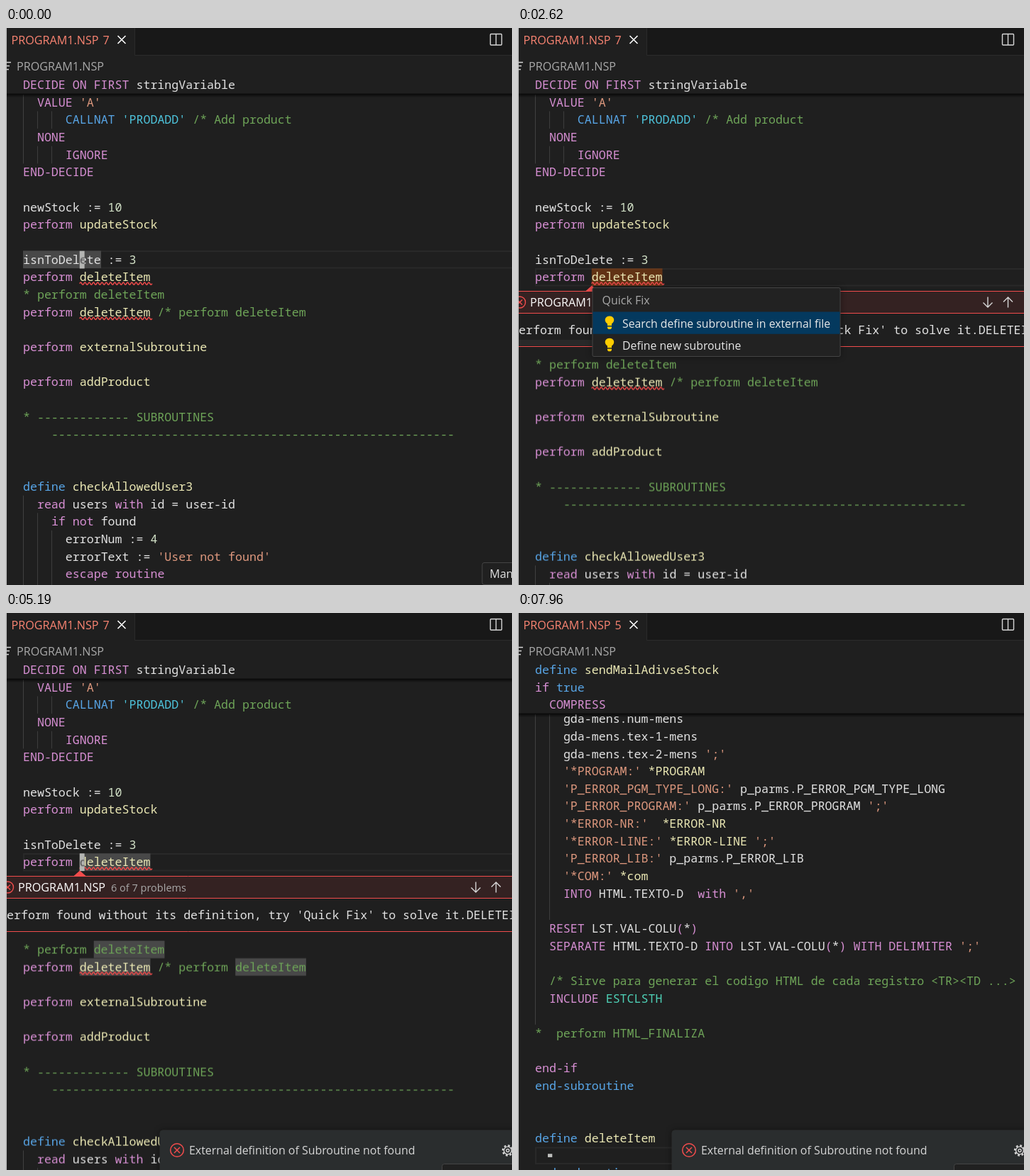
Animation, 713 px wide and 786 px high, one loop 8 s. Source, as an HTML page:

```html
<!DOCTYPE html>
<html lang="en">
<head>
<meta charset="utf-8">
<title>Editor quick fix</title>
<style>
html, body { margin: 0; width: 100%; height: 100%; overflow: hidden; background: #1f1f1f; }
svg { display: block; }
text { white-space: pre; font: 16px 'Open Sans', 'Noto Sans', sans-serif; fill: #d6d6d6; }
.mono, .mono text { font: 500 16.62px 'Noto Sans Mono', 'DejaVu Sans Mono', monospace; fill: #e2e2e2; }
.k { fill: #d78fd3; } .b { fill: #58a5e6; } .f { fill: #ebe8b4; } .s { fill: #de987e; }
.n { fill: #d3e2c8; } .c { fill: #6ea458; } .t { fill: #4ed0b6; } .v { fill: #4ec4dc; }
.dim { fill: #a9a9a9; } .bad { fill: #fa8472; } .title { font-size: 16.15px; }
.bg { fill: #1f1f1f; }
.guide { fill: #404040; }
.mark { fill: #484848; }
.row { fill: none; stroke: #292929; stroke-width: 2; }
.red { fill: none; stroke: #f14c4c; }
.icon { fill: none; stroke: #d6d6d6; stroke-width: 1.4; }
.pop { fill: #202020; stroke: #454545; }

/* 1% of the loop is 80 ms */
.anim { animation: 8s step-end infinite; }
#first { animation-name: first; }
#second, #cursorEnd { animation-name: second; }
#low { animation-name: low; }
#start { animation-name: start; }
#curA { animation-name: curA; }
#curB { animation-name: curB; }
#curC { animation-name: curC; }
#peek, #line { animation-name: peek; }
#bar { animation-name: bar; }
.words { animation-name: words; }
#menu, #target { animation-name: menu; }
#pick { animation-name: pick; }
#splitV { animation-name: splitV; }
#splitH { animation-name: splitH; }
#tip { animation-name: tip; }
#stickyA, #seven { animation-name: before; }
#stickyB, #five { animation-name: after; }
.hover { animation-name: hover; }
#gear { animation-name: gear; }
#toast { animation: toast 8s infinite; }
.blink { animation: blink 8s ease-in-out infinite; }

@keyframes first { 0% { opacity: 1 } 85.25%, 100% { opacity: 0 } }
@keyframes second { 0% { opacity: 0 } 85.25%, 100% { opacity: 1 } }
@keyframes low { 0% { transform: none } 20%, 100% { transform: translateY(98.6px) } }
@keyframes start { 0% { opacity: 1 } 20%, 100% { opacity: 0 } }
@keyframes curA { 0% { opacity: 1 } .8%, 100% { opacity: 0 } }
@keyframes curB { 0% { opacity: 0 } .8% { opacity: 1 } 20%, 100% { opacity: 0 } }
@keyframes curC {
  0% { opacity: 0 } 20% { opacity: 1 } 32.625% { opacity: 0 } 46.875% { opacity: 1 }
  71.625% { opacity: 0 } 84.25%, 100% { opacity: 1 }
}
@keyframes peek { 0% { opacity: 0 } 20%, 100% { opacity: 1 } }
@keyframes bar { 0% { opacity: 1 } 46.875%, 100% { opacity: 0 } }
@keyframes words { 0% { opacity: 0 } 49.25%, 100% { opacity: 1 } }
@keyframes menu {
  0% { opacity: 0 } 32.625% { opacity: 1 } 46.875% { opacity: 0 }
  71.625% { opacity: 1 } 84.25%, 100% { opacity: 0 }
}
@keyframes pick { 0% { transform: none } 80.125%, 100% { transform: translateY(31.3px) } }
@keyframes splitV { 0% { opacity: 1 } 16.7% { opacity: 0 } 24.25%, 100% { opacity: 1 } }
@keyframes splitH { 0% { opacity: 0 } 16.7% { opacity: 1 } 24.25%, 100% { opacity: 0 } }
@keyframes tip { 0% { opacity: 1 } 24.25%, 100% { opacity: 0 } }
@keyframes before { 0% { opacity: 1 } 89.125%, 100% { opacity: 0 } }
@keyframes after { 0% { opacity: 0 } 89.125%, 100% { opacity: 1 } }
@keyframes hover { 0% { opacity: 0 } 54.5% { opacity: 1 } 68.125% { opacity: 0 } 91%, 100% { opacity: 1 } }
@keyframes gear { 0% { opacity: 0 } 58% { opacity: 1 } 68.125% { opacity: 0 } 91%, 100% { opacity: 1 } }
@keyframes toast {
  0%, 48.125% { opacity: 0; transform: translateY(56px); animation-timing-function: ease-out }
  51.875%, 100% { opacity: 1; transform: none }
}
@keyframes blink {
  0%, 5.75% { transform: none } 11.25%, 13.5% { transform: scaleY(0) }
  17.5%, 24% { transform: none } 29.1%, 31.2% { transform: scaleY(0) }
  32.7%, 55.4% { transform: none } 59.75%, 61.2% { transform: scaleY(0) }
  64.8%, 67.9% { transform: none } 71.7% { transform: scaleY(0) }
  71.8%, 91.6% { transform: none } 96.1% { transform: scaleY(0) }
  98.375% { transform: scaleY(0); animation-timing-function: ease-in }
  100% { transform: scaleY(.35) }
}
</style>
</head>
<body>
<svg width="713" height="786" viewBox="0 0 713 786">
  <rect class="bg" width="713" height="786"/>

  <g id="first" class="anim">
    <g id="start" class="anim">
      <rect class="row" x="25" y="315" width="700" height="23.5"/>
      <rect class="mark" x="24" y="314.4" width="110" height="24.6"/>
    </g>
    <rect id="line" class="row anim" x="25" y="340" width="700" height="23.5"/>
    <g id="top" class="mono"></g>
    <g id="low" class="mono anim"></g>
    <g id="curA" class="anim" data-cursor="8 9 e"></g>
    <g id="curB" class="anim" data-cursor="0 9 i"></g>
    <g id="curC" class="anim" data-cursor="8 10 d"></g>

    <g id="peek" class="anim">
      <rect class="bg" y="371" width="713" height="79"/>
      <rect y="372" width="713" height="30" fill="#342222"/>
      <path d="M95 371.5L104 363.5L113 371.5Z" fill="#f14c4c"/>
      <path class="red" d="M0 371.5H713M0 402.5H713M0 449.5H713"/>
      <g class="red" stroke-width="1.4"><circle cx="2.5" cy="387" r="8"/><path d="M-1 383.5l7 7m0-7l-7 7"/></g>
      <text class="title" x="17" y="393" style="fill:#fff;font-weight:500">PROGRAM1.NSP</text>
      <text x="148" y="393" class="dim" style="font-size:14.5px">6 of 7 problems</text>
      <path class="icon" d="M662 379.5V394m-6.5-6.5l6.5 6.5l6.5-6.5M690.5 394.5V380m-6.5 6.5l6.5-6.5l6.5 6.5"/>
      <rect id="bar" class="anim" y="440" width="388" height="8" fill="#292929"/>
      <text class="mono" x="1" y="431.5">erform found without its definition, try 'Quick Fix' to solve it.DELETEITEM</text>
    </g>
  </g>

  <g id="second" class="anim">
    <rect class="row" x="25" y="754.5" width="700" height="22.5"/>
    <g id="end" class="mono"></g>
  </g>
  <g id="cursorEnd" class="anim"><g transform="translate(42 765.6)"><rect class="blink" y="-12.3" width="6.2" height="24.6" fill="#c0c1bf"/></g></g>

  <g id="stickyA" class="anim">
    <rect y="93" width="713" height="5" fill="url(#shade)"/>
    <rect class="bg" y="67" width="713" height="26"/>
    <rect y="92.5" width="713" height="1.5" fill="#0c0c0c"/>
    <g id="headA" class="mono"></g>
  </g>
  <g id="stickyB" class="anim">
    <rect y="142" width="713" height="5" fill="url(#shade)"/>
    <rect class="bg" y="67" width="713" height="75"/>
    <rect y="141.5" width="713" height="1.5" fill="#0c0c0c"/>
    <g id="headB" class="mono"></g>
  </g>

  <rect class="bg" width="713" height="67"/>
  <rect x="182" width="531" height="39" fill="#181818"/>
  <path d="M181.5 0V38.5H713" fill="none" stroke="#2b2b2b"/>
  <text class="bad title" x="7.5" y="22.8">PROGRAM1.NSP</text>
  <text id="seven" class="bad anim" x="136.5" y="22.8">7</text>
  <text id="five" class="bad anim" x="136.5" y="22.8">5</text>
  <path d="M157.5 11l11 11m0-11l-11 11" fill="none" stroke="#fff" stroke-width="1.6"/>
  <rect class="icon" x="682.5" y="8.5" width="16" height="15.5" rx="1"/>
  <path id="splitV" class="icon anim" d="M690.5 8.5V24"/>
  <path id="splitH" class="icon anim" d="M682.5 16.2H698.5"/>
  <path class="icon" d="M0 48.5H7M0 53.5H5M0 58.5H4"/>
  <text class="dim title" x="15" y="59.8">PROGRAM1.NSP</text>

  <g id="menu" class="anim">
    <rect class="pop" x="105" y="366.5" width="349" height="97" rx="2" filter="url(#drop)"/>
    <rect id="pick" class="anim" x="105.5" y="400.5" width="348" height="31.3" fill="#04395e"/>
    <text class="dim" x="118.5" y="390">Quick Fix</text>
    <text x="147" y="422.6" style="font-size:15.8px;fill:#e8e8e8">Search define subroutine in external file</text>
    <text x="147" y="453.8" style="font-size:15.8px;fill:#e8e8e8">Define new subroutine</text>
    <path id="bulb" d="M126 420V417.5C120 413 123 406.5 129 406.5S138 413 132 417.5V420ZM126 421.5H132V423.5L130.5 425H127.5L126 423.5Z" fill="#fc0"/>
    <use href="#bulb" y="31.3"/>
  </g>

  <g id="tip" class="anim">
    <rect class="pop" x="671" y="754.5" width="60" height="31" rx="3"/>
    <text x="681.5" y="775.8" style="fill:#e2e2e2">Man</text>
  </g>

  <g id="toast">
    <rect x="217" y="730" width="520" height="70" rx="4" fill="#1f1f1f" stroke="#2b2b2b" filter="url(#drop)"/>
    <rect class="hover anim" x="217" y="730" width="520" height="70" rx="4" fill="#2a2d2e"/>
    <g class="red" stroke-width="1.5"><circle cx="241" cy="758" r="9.3"/><path d="M237 754l8 8m0-8l-8 8"/></g>
    <text x="258" y="764" style="font-size:15.9px">External definition of Subroutine not found</text>
    <g id="gear" class="icon anim">
      <circle cx="707" cy="758.5" r="7" stroke-width="2.4" stroke-dasharray="2.75"/>
      <circle cx="707" cy="758.5" r="5.4"/><circle cx="707" cy="758.5" r="2"/>
    </g>
    <rect class="pop hover anim" x="614.5" y="777.5" width="120" height="31" rx="3"/>
  </g>
  <rect width="1" height="786" fill="#c4c4c4"/>

  <defs>
    <linearGradient id="shade" x2="0" y2="1"><stop stop-color="#000" stop-opacity=".7"/><stop offset="1" stop-color="#000" stop-opacity="0"/></linearGradient>
    <filter id="drop" x="-10%" y="-30%" width="120%" height="160%"><feDropShadow dx="0" dy="0" stdDeviation="4" flood-opacity=".4"/></filter>
  </defs>
</svg>

<script>
const CHAR = 9.972, LINE = 24.65, LEFT = 24, TOP = 105.1, END = 149.5;
const $ = id => document.getElementById(id);
const colX = c => LEFT + c * CHAR;

// {x word} colours a word with class x
const paint = s => s.replace(/\{(\w) ([^}]*)\}/g, '<tspan class="$1">$2</tspan>');

function code(id, y, lines, from = 0) {
  $(id).innerHTML += lines.map((s, i) => {
    const body = s.trimStart();
    return body && `<text x="${colX(s.length - body.length)}" y="${y + (from + i) * LINE + 5.7}">${paint(body)}</text>`;
  }).join('');
}

function box(id, y, row, col, width, height, attrs) {
  $(id).innerHTML += `<rect x="${colX(col)}" y="${y + (row - .5) * LINE}" width="${width}" height="${height * LINE}" ${attrs}/>`;
}
const guide = (id, y, col, row, rows) => box(id, y, row, col, 1, rows, 'class="guide"');
const mark = (id, row, col) => box(id, TOP, row, col, 10 * CHAR, 1, 'class="mark words anim"');

function squiggle(id, row, col) {
  const wave = 'q1.5 -3.4 3 0t3 0'.repeat(17);
  $(id).innerHTML += `<path class="red" stroke-width="1.5" d="M${colX(col)} ${TOP + row * LINE + 9}${wave}"/>`;
}

// Upper part of the program
guide('top', TOP, 0, 0, 4);
for (const row of [1, 3]) for (const col of [2, 4]) guide('top', TOP, col, row, 1);
mark('top', 10, 8);
box('top', TOP, 10, 8, 10 * CHAR, 1, 'id="target" class="anim" fill="#ea5c00" fill-opacity=".33"');
code('top', TOP, [
  "  {k VALUE} {s 'A'}",
  "      {b CALLNAT} {v 'PRODADD'} {c /* Add product}",
  "  {k NONE}",
  "      {k IGNORE}",
  "{k END-DECIDE}",
  "",
  "newStock := {n 10}",
  "{k perform} {f updateStock}",
  "",
  "isnToDelete := {n 3}",
  "{k perform} {f deleteItem}"
]);
squiggle('top', 10, 8);

// Lower part, pushed down by the problem panel
guide('low', TOP, 0, 23, 6);
guide('low', TOP, 2, 24, 5);
guide('low', TOP, 4, 25, 4);
mark('low', 11, 10);
mark('low', 12, 8);
mark('low', 12, 30);
code('low', TOP, [
  "{c * perform deleteItem}",
  "{k perform} {f deleteItem} {c /* perform deleteItem}",
  "",
  "{k perform} {f externalSubroutine}",
  "",
  "{k perform} {f addProduct}",
  "",
  `{c * ${'-'.repeat(13)} SUBROUTINES}`,
  `    {c ${'-'.repeat(57)}}`,
  "", "",
  "{b define} {f checkAllowedUser3}",
  "  {k read} users {k with} id = user-id",
  "    {k if not} found",
  "      errorNum := {n 4}",
  "      errorText := {s 'User not found'}",
  "      {k escape routine}"
], 11);
squiggle('low', 12, 8);

// End of the program with the new subroutine
guide('end', END, 0, -2, 20);
guide('end', END, 2, -2, 14);
code('end', END, [
  "  {k COMPRESS}",
  "    gda-mens.cod-mens",
  "    gda-mens.num-mens",
  "    gda-mens.tex-1-mens",
  "    gda-mens.tex-2-mens {s ';'}",
  "    {s '*PROGRAM:'} {f *PROGRAM}",
  "    {s 'P_ERROR_PGM_TYPE_LONG:'} p_parms.P_ERROR_PGM_TYPE_LONG",
  "    {s 'P_ERROR_PROGRAM:'} p_parms.P_ERROR_PROGRAM {s ';'}",
  "    {s '*ERROR-NR:'}  {f *ERROR-NR}",
  "    {s '*ERROR-LINE:'} {f *ERROR-LINE} {s ';'}",
  "    {s 'P_ERROR_LIB:'} p_parms.P_ERROR_LIB",
  "    {s '*COM:'} {f *com}",
  "    {k INTO} HTML.TEXTO-D  {k with} {s ','}",
  "",
  "  {k RESET} LST.VAL-COLU{k (}*{k )}",
  "  {k SEPARATE} HTML.TEXTO-D {k INTO} LST.VAL-COLU{k (}*{k )} {k WITH DELIMITER} {s ';'}",
  "",
  "  {c /* Sirve para generar el codigo HTML de cada registro &lt;TR>&lt;TD ...>}",
  "  {k INCLUDE} {t ESTCLSTH}",
  "",
  "{c *  perform HTML_FINALIZA}",
  "",
  "{k end-if}",
  "{b end-subroutine}",
  "", "",
  "{b define} {f deleteItem}",
  "",
  "{b end-subroutine}"
], -2);

code('headA', 80.2, ["{k DECIDE ON FIRST} stringVariable"]);
code('headB', 80.2, ["{b define} {f sendMailAdivseStock}", "{k if} {b true}", "  {k COMPRESS}"]);

for (const g of document.querySelectorAll('[data-cursor]')) {
  const [col, row, char] = g.dataset.cursor.split(' ');
  g.innerHTML = `<g transform="translate(${colX(+col)} ${TOP + row * LINE})"><g class="blink">
    <svg y="-12.3" width="6.2" height="24.6"><rect width="7" height="25" fill="#b4b5b3"/>
    <text class="mono" y="18" style="fill:#515052">${char}</text></svg></g></g>`;
}
</script>
</body>
</html>
```
